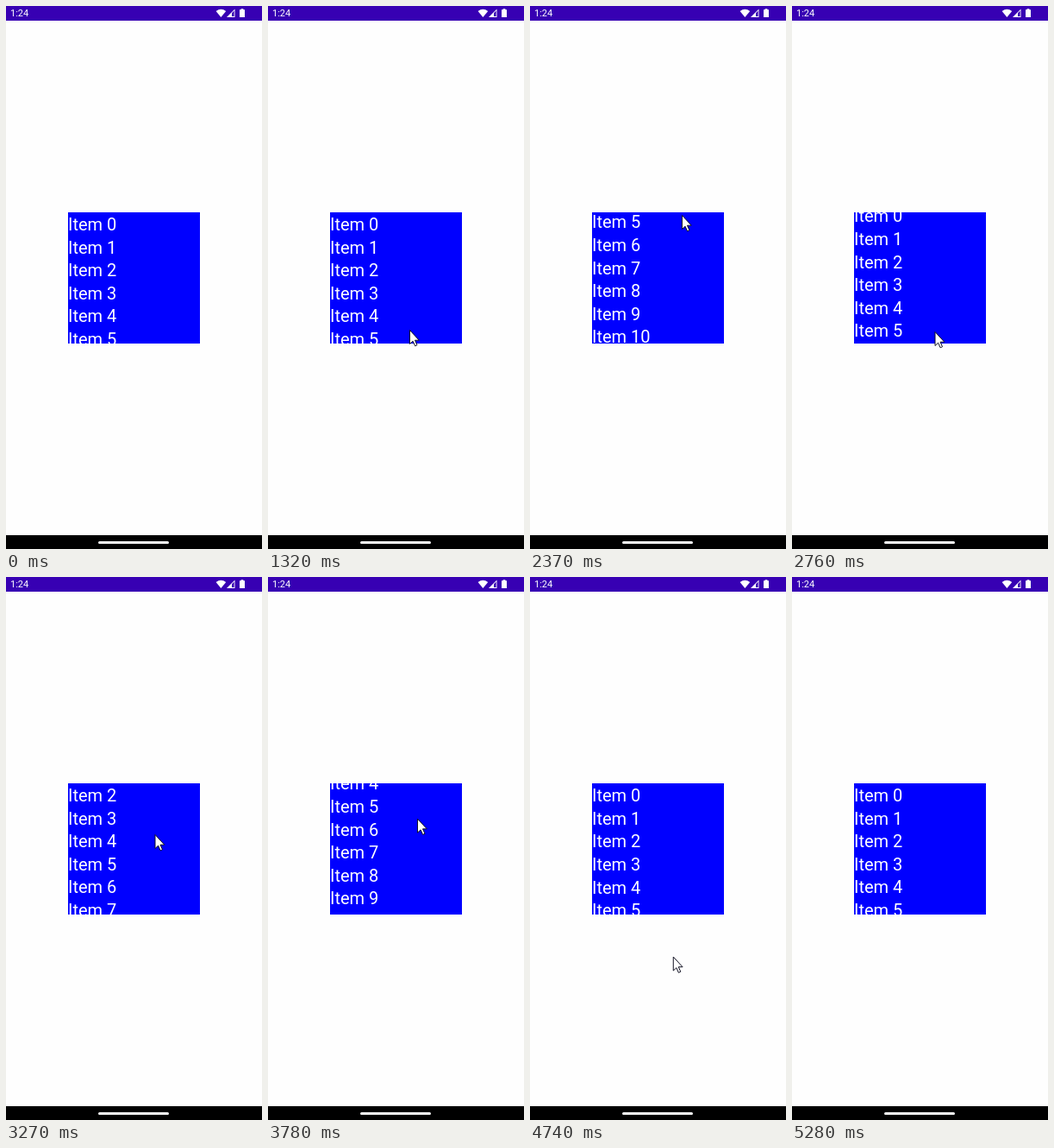
Animation, 297 px wide and 629 px high, one loop 6.94 s. Source, as an HTML page:

```html
<!DOCTYPE html>
<html lang="en">
<head>
<meta charset="utf-8">
<title>Scrolling list</title>
<style>
  html, body { margin: 0; width: 100%; height: 100%; overflow: hidden; background: #fefefe; }
  svg { display: block; }
  text { font-family: Roboto, sans-serif; fill: #fff; }
</style>
</head>
<body>
<svg width="297" height="629" viewBox="0 0 297 629">
  <rect width="297" height="629" fill="#fefefe"/>

  <rect width="297" height="17" fill="#3700b3"/>
  <text x="5" y="12.4" font-size="11">1:24</text>
  <g fill="#fff">
    <path d="M243.6 6Q249.4 1.4 255.2 6L249.4 13Z"/>
    <path d="M256 13L265.5 3.5V13Z"/>
    <path d="M262 8.2L264.6 5.6V12.1H262Z" fill="#3700b3"/>
    <path d="M271 4.2H272.6V3.2H275.4V4.2H277V13H271Z"/>
  </g>

  <svg x="72" y="239" width="153" height="152">
    <rect width="153" height="152" fill="#00f"/>
    <g id="list" font-size="20"></g>
  </svg>

  <rect y="613" width="297" height="16"/>
  <rect x="107" y="620" width="82" height="3" rx="1.5" fill="#f4f4f4"/>

  <path id="cursor" d="M.5 .5V16.5L4.1 13.2L6.6 18.8L9 17.7L6.5 12.2H11.3Z"
        fill="#fff" stroke="#111122" stroke-linejoin="round"/>
</svg>
<script>
const LOOP = 6940, ENTER = 806, LEAVE = 5280, STEP = 127;
const PRESS = 1470, RELEASE = 4320;
const ROW = 26.6;
const REST_Y = 378;    // pointer height at which the list sits at its top
const LAG = 80;        // the list trails the pointer

// Turning points of the pointer: time, x, y
const path = [
  [ENTER, 250, 470], [1187, 168, 373], [1314, 164, 375],
  [PRESS, 162, 383], [1949, 170.5, 264], [2360, 176, 242],
  [2580, 170, 353], [2711, 165.5, 377], [3000, 167, 370],
  [3219, 172.5, 298], [3520, 176, 243], [4108, 165.5, 414],
  [4290, 165.5, 439], [4600, 165.5, 439],
  [4860, 206, 513], [5170, 268, 612], [LEAVE, 290, 650]
];

const list = document.getElementById('list');
const cursor = document.getElementById('cursor');
for (let i = 0; i < 20; i++) {
  const item = document.createElementNS('http://www.w3.org/2000/svg', 'text');
  item.setAttribute('y', 21 + i * ROW);
  item.textContent = 'Item ' + i;
  list.append(item);
}

// Slope through a point; flat where the motion turns or rests
function slope(i, axis) {
  const [a, b, c] = [path[i - 1], path[i], path[i + 1]];
  if (!a || !c || (b[axis] - a[axis]) * (c[axis] - b[axis]) <= 0) return 0;
  return (c[axis] - a[axis]) / (c[0] - a[0]);
}

// Smooth curve through the turning points (cubic Hermite)
function pointer(time, axis) {
  const t = Math.max(time, ENTER);
  const i = path.findLastIndex(p => p[0] <= t);
  const a = path[i], b = path[i + 1];
  const span = b[0] - a[0], u = (t - a[0]) / span, v = 1 - u;
  return a[axis] * v * v * (1 + 2 * u) + b[axis] * u * u * (1 + 2 * v)
    + span * u * v * (slope(i, axis) * v - slope(i + 1, axis) * u);
}

function draw(time) {
  const visible = time >= ENTER && time < LEAVE;
  cursor.setAttribute('visibility', visible ? 'visible' : 'hidden');

  let offset = 0, stretch = 1;
  if (visible) {
    const t = time - (time - ENTER) % STEP;   // the screen refreshes in steps
    cursor.setAttribute('transform', `translate(${pointer(t, 1)} ${pointer(t, 2)})`);
    if (t - LAG > PRESS) {
      offset = REST_Y - pointer(Math.min(t, RELEASE) - LAG, 2);
      // Pulling past the top stretches the rows, then they settle back
      const settle = Math.exp(Math.min(0, RELEASE - t) / 100);
      stretch += Math.max(0, -offset) * 0.0003 * settle;
    }
  }
  list.setAttribute('transform', `translate(0 ${-Math.max(0, offset)}) scale(1 ${stretch})`);
}

const begin = performance.now();
function tick() {
  draw((performance.now() - begin) % LOOP);
  requestAnimationFrame(tick);
}
tick();
</script>
</body>
</html>
```
